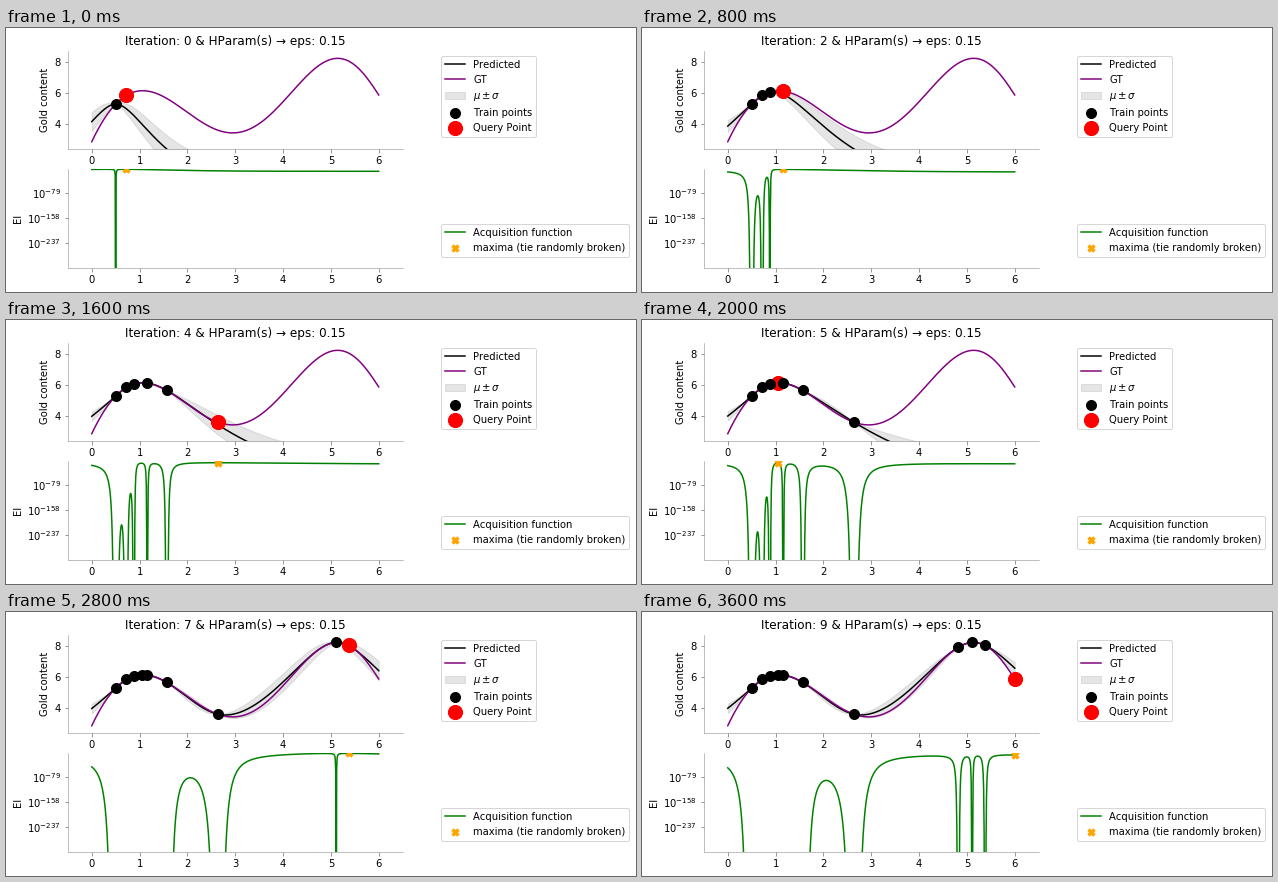
A matplotlib script for the animation above (4000 ms loop, 630 px wide and 264 px high).

```python
import math

import matplotlib.pyplot as plt
import numpy as np
from matplotlib.animation import FuncAnimation

W, H, DPI = 630, 264, 72
STEPS, STEP_MS = 10, 400
EPS = 0.15

plt.rcParams["font.family"] = "DejaVu Sans"
plt.rcParams["font.size"] = 10
plt.rcParams["text.kerning_factor"] = 6

# Ground truth: a smooth polynomial through a few anchor points
ANCHORS = np.array([
    (0, 2.84), (0.5, 5.25), (0.72, 5.82), (0.88, 6.06), (1.06, 6.15),
    (1.57, 5.63), (2, 4.7), (2.64, 3.56), (2.9, 3.46), (4, 5.38),
    (4.82, 7.95), (5.11, 8.21), (5.38, 8.02), (6, 5.86),
])
truth = np.poly1d(np.polyfit(*ANCHORS.T, 7))

# Sampled points in the order they are queried
SAMPLES = np.array([0.5, 0.72, 0.88, 1.16, 1.57, 2.64, 1.05, 5.11, 5.38, 4.82, 6.0])
grid = np.linspace(0, 6, 601)
gold = truth(grid)


def matern(a, b, length):
    r = math.sqrt(3) * np.abs(a[:, None] - b[None, :]) / length
    return (1 + r) * np.exp(-r)


def gram(x, length):
    return matern(x, x, length) + 1e-10 * np.eye(len(x))


def likelihood(x, y, length):
    k = gram(x, length)
    return -0.5 * y @ np.linalg.solve(k, y) - 0.5 * np.linalg.slogdet(k)[1]


def fit_length(x, y):
    if len(x) == 1:
        return 1.0
    return max(np.geomspace(0.3, 10, 400), key=lambda s: likelihood(x, y, s))


def posterior(x, y):
    length = fit_length(x, y)
    k, cross = gram(x, length), matern(x, grid, length)
    mean = cross.T @ np.linalg.solve(k, y)
    var = 1 - np.sum(cross * np.linalg.solve(k, cross), axis=0)
    return mean, np.sqrt(np.maximum(var, 1e-10))


def log_gain(z):
    """log10 of pdf(z) + z * cdf(z), stable for very negative z."""
    log_pdf = -0.5 * z * z - 0.5 * math.log(2 * math.pi)
    if z < -5:
        q = 1 / (z * z)
        tail = math.log(q * (1 - 3 * q + 15 * q**2 - 105 * q**3))
        return (log_pdf + tail) / math.log(10)
    cdf = 0.5 * math.erfc(-z / math.sqrt(2))
    return math.log10(math.exp(log_pdf) + z * cdf)


def solve_step(i):
    x = SAMPLES[:i + 1]
    y = truth(x)
    mean, std = posterior(x, y)
    z = (mean - y.max() - EPS) / std
    gain = np.log10(std) + np.array([log_gain(v) for v in z])
    return mean, std, np.maximum(gain, -1000)


states = [solve_step(i) for i in range(STEPS)]

fig, (top, low) = plt.subplots(2, 1, figsize=(W / DPI, H / DPI), dpi=DPI)
fig.subplots_adjust(left=61.85 / W, right=396.65 / W,
                    bottom=1 - 240 / H, top=1 - 22.6 / H, hspace=0.2)


def style(ax, label):
    for side in ("top", "right"):
        ax.spines[side].set_visible(False)
    for side in ("left", "bottom"):
        ax.spines[side].set(color="gray", linewidth=0.5)
    ax.tick_params(direction="out", color="gray")
    ax.set(xlim=(-0.5, 6.5), xticks=range(7), ylabel=label)


predicted, = top.plot([], [], "k", label="Predicted")
top.plot(grid, gold, "purple", label="GT")
band = top.fill_between(grid, gold, gold, color="gray", alpha=0.2,
                        label=r"$\mu \pm \sigma$")
train = top.scatter([], [], s=100, c="black", zorder=10, label="Train points")
query = top.scatter([], [], s=200, c="red", zorder=9, label="Query Point")
style(top, "Gold content")
top.set(ylim=(gold.min() - 0.5, gold.max() + 0.5), yticks=(4, 6, 8))
top.legend(loc="upper left", bbox_to_anchor=(1.1, 1))

# The lower axis holds log10 of the expected improvement
powers = (-79, -158, -237)
gain_line, = low.plot([], [], "green", label="Acquisition function")
best = low.scatter([], [], s=50, c="orange", marker="X", zorder=10,
                   label="maxima (tie randomly broken)")
style(low, "EI")
low.set_ylim(-317, -1.5)
low.set_yticks(powers, [rf"$\mathdefault{{10^{{{p}}}}}$" for p in powers])
low.legend(loc="upper left", bbox_to_anchor=(1.1, 0.5))

title = top.set_title("")


def draw(i):
    mean, std, gain = states[i]
    x, nxt = SAMPLES[:i + 1], SAMPLES[i + 1]
    title.set_text(f"Iteration: {i} & HParam(s) \u2192 eps: {EPS}")
    predicted.set_data(grid, mean)
    band.set_verts([np.column_stack([
        np.r_[grid, grid[::-1]],
        np.r_[mean + std, (mean - std)[::-1]],
    ])])
    train.set_offsets(np.column_stack([x, truth(x)]))
    query.set_offsets([(nxt, truth(nxt))])
    gain_line.set_data(grid, gain)
    best.set_offsets([(nxt, np.interp(nxt, grid, gain))])
    return predicted, band, train, query, gain_line, best, title


anim = FuncAnimation(fig, draw, frames=STEPS, interval=STEP_MS,
                     init_func=lambda: draw(0), repeat=True, repeat_delay=0)
plt.show()
```
